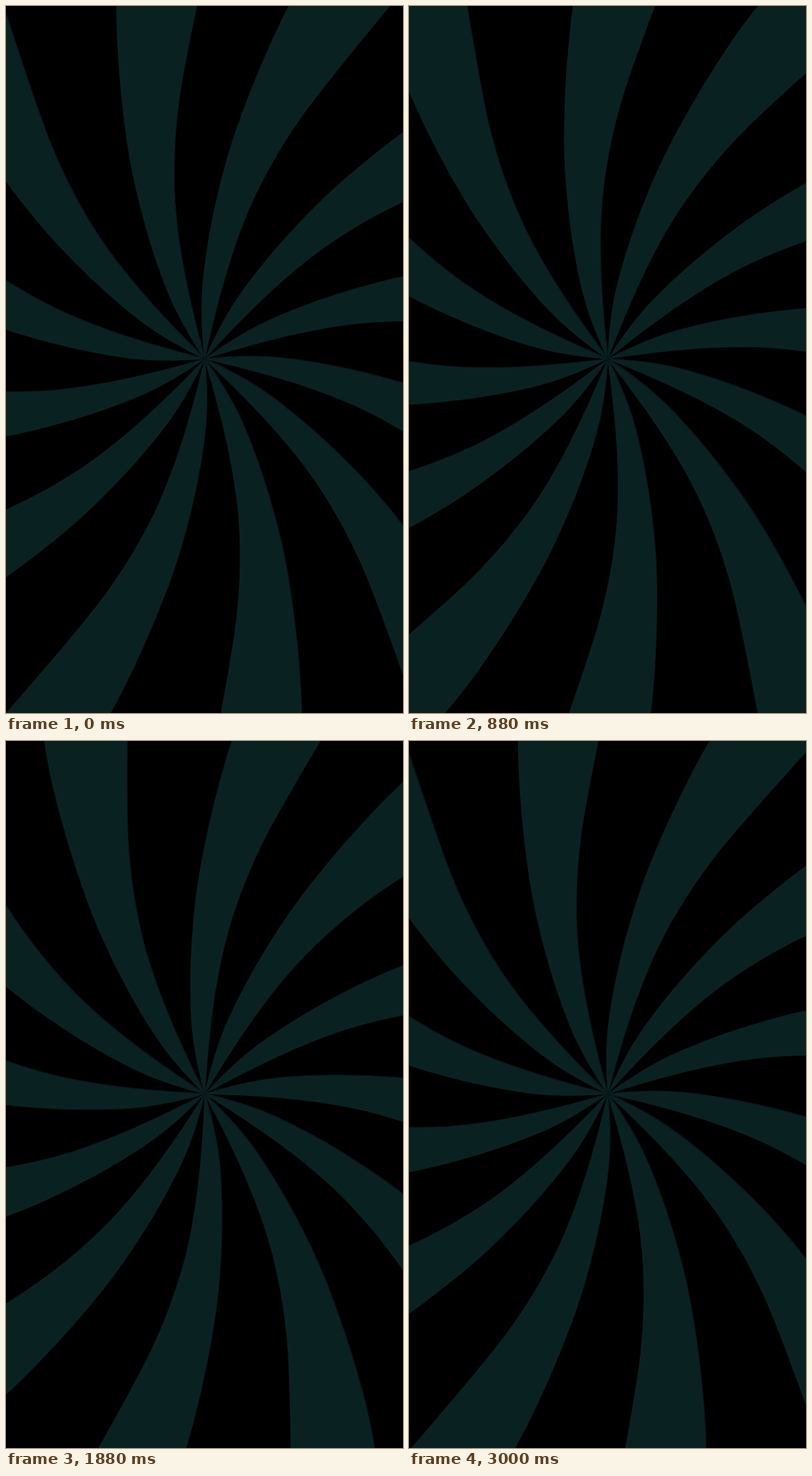
An HTML page for the animation above (3040 ms loop, 561 px wide and 998 px high).

```html
<!DOCTYPE html>
<html lang="en">
<head>
<meta charset="utf-8">
<title>Swirl</title>
<style>
  html, body { margin: 0; width: 100%; height: 100%; overflow: hidden; background: #000; }
  svg { display: block; width: 100%; height: 100%; }
</style>
</head>
<body>
<svg viewBox="0 0 561 998">
  <defs><g id="swirl"></g></defs>
  <!-- A navy fringe shows along the edges that face up and right. -->
  <use href="#swirl" x="1.2" y="-1.2" fill="#0b1620"/>
  <use href="#swirl" fill="#092221"/>
</svg>
<script>
const LOOP = 3040, FRAME = 40, DEGREES_PER_FRAME = 0.4;
const CENTER = [280.5, 498.5];
const ARMS = 12, ARM_SPACING = 30.23;
const KNOT_STEP = 72, SAMPLE_STEP = 6, MAX_RADIUS = 640;

// Edge angles, clockwise from up, at radii 0, 72, 144, ...
const TRAILING = [-34, -30.9, -26.8, -23.6, -21, -18.5, -16.3, -14.3, -12.2, -10.2];
const LEADING = [-15.3, -14.3, -12.95, -11.1, -8.6, -5.95, -3.3, -1.15, 0.55, 2.2];

function angleAt(knots, radius) {
  const i = Math.min(Math.floor(radius / KNOT_STEP), knots.length - 2);
  const u = radius / KNOT_STEP - i;
  const b = knots[i], c = knots[i + 1];
  const a = knots[i - 1] ?? 2 * b - c;
  const d = knots[i + 2] ?? 2 * c - b;
  return b + u / 2 * (c - a + u * (2 * a - 5 * b + 4 * c - d + u * (3 * (b - c) + d - a)));
}

function edge(knots) {
  const points = [];
  for (let r = 0; r <= MAX_RADIUS; r += SAMPLE_STEP) {
    const angle = angleAt(knots, r) * Math.PI / 180;
    points.push((r * Math.sin(angle)).toFixed(2) + "," + (-r * Math.cos(angle)).toFixed(2));
  }
  return points;
}

const swirl = document.getElementById("swirl");
const outline = [...edge(TRAILING), ...edge(LEADING).reverse()].join(" ");

// The spacing is slightly over 30 degrees, so one gap is narrower.
for (let i = 0; i < ARMS; i++) {
  const arm = document.createElementNS("http://www.w3.org/2000/svg", "polygon");
  arm.setAttribute("points", outline);
  arm.setAttribute("transform", `rotate(${-i * ARM_SPACING})`);
  swirl.append(arm);
}

function draw(time) {
  const angle = Math.floor((time % LOOP) / FRAME) * DEGREES_PER_FRAME;
  swirl.setAttribute("transform", `translate(${CENTER}) rotate(${angle})`);
}

const start = performance.now();
function tick() {
  draw(performance.now() - start);
  requestAnimationFrame(tick);
}
tick();
</script>
</body>
</html>
```
